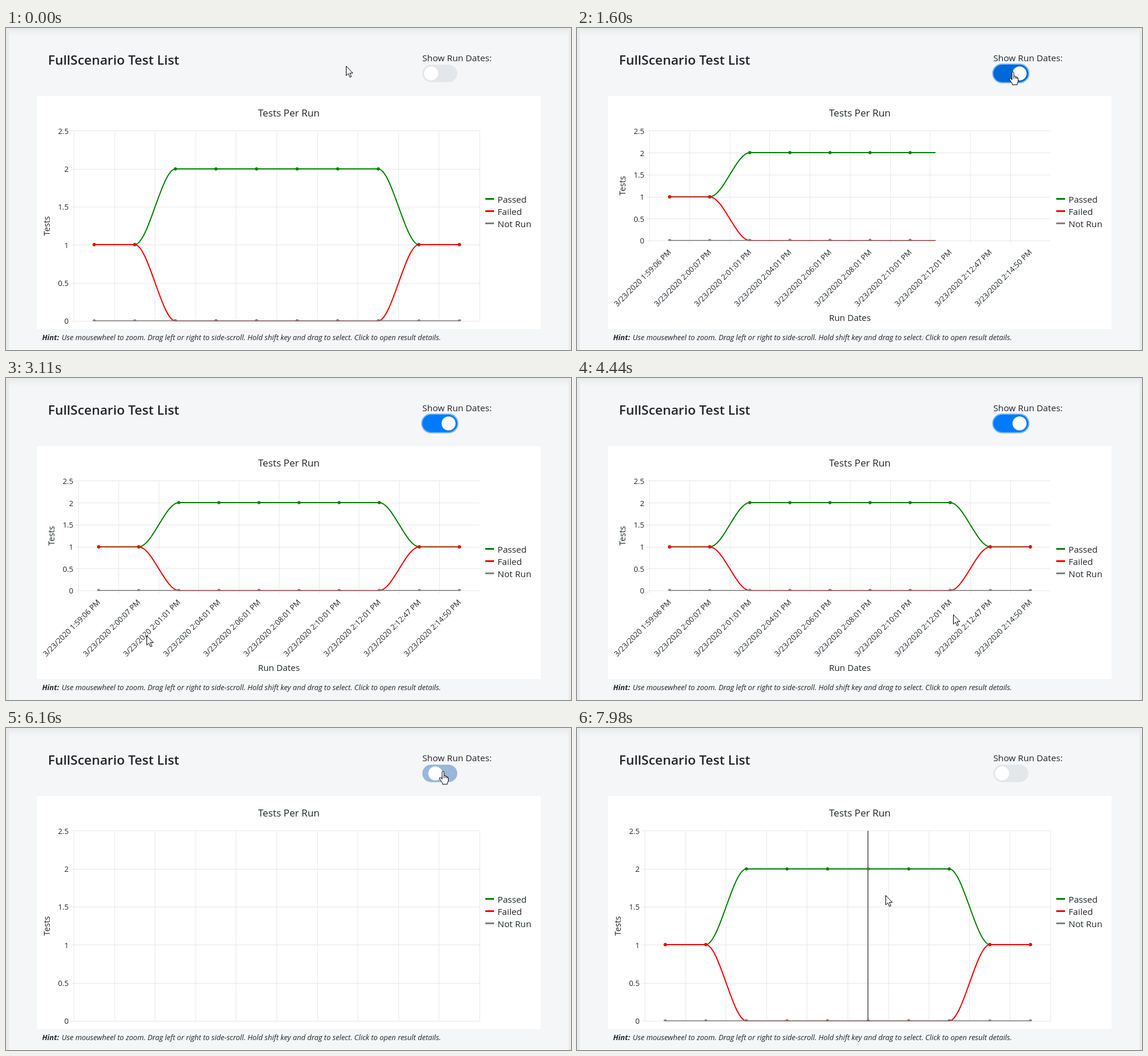
An HTML page that plays this animation: 969x553 px, repeating every 8 s.

```html
<!DOCTYPE html>
<html lang="en">
<head>
<meta charset="utf-8">
<title>Test list chart</title>
<style>
  html, body { margin: 0; width: 100%; height: 100%; overflow: hidden; background: #f5f6f8; }
  svg { display: block; font-family: "Open Sans", "Noto Sans", sans-serif; fill: #212529; }
  .tick { font-size: 13px; }
  .end { text-anchor: end; }
  .mid { text-anchor: middle; }
  .line { fill: none; stroke-width: 2; }
  .grid { fill: none; stroke: #e8e8e8; }
</style>
</head>
<body>
<svg width="969" height="553" viewBox="0 0 969 553">
  <defs>
    <linearGradient id="shade" x2="0" y2="1">
      <stop stop-color="#e9eaec"/><stop offset="1" stop-color="#f5f6f8"/>
    </linearGradient>
  </defs>
  <rect width="969" height="553" fill="#f5f6f8"/>
  <rect width="969" height="14" fill="url(#shade)"/>
  <path d="M0 0H5V553H0ZM965 0H969V553H965Z" fill="#e9eaec"/>
  <text x="72" y="63" font-size="22.4" font-weight="600">FullScenario Test List</text>
  <text x="714" y="57" font-size="15.2">Show Run Dates:</text>
  <rect id="ring" x="712" y="61" width="64" height="34" rx="17" fill="#7ab8fb"/>
  <rect id="track" x="714" y="63" width="60" height="30" rx="15"/>
  <circle id="knob" cy="78" r="12" fill="#fff"/>
  <rect x="53" y="117" width="864" height="400" fill="#fff"/>
  <text class="mid" x="485" y="152" font-size="16.8">Tests Per Run</text>
  <g id="charts"></g>
  <path id="hair" stroke="#777" stroke-width="2"/>
  <g id="legend" font-size="15.2"></g>
  <g font-size="12.63" font-style="italic">
    <text x="62" y="536" font-weight="700">Hint:</text>
    <text x="95.5" y="536">Use mousewheel to zoom. Drag left or right to side-scroll. Hold shift key and drag to select. Click to open result details.</text>
  </g>
  <path id="arrow" d="M.5 .5V16.8L4.2 13.4L6.8 19.6L9.3 18.5L6.7 12.4H11.8Z" fill="#fff" stroke="#000"/>
  <path id="hand" d="M-2 2Q-2 .5 -.4 .5T1.2 2V7.5Q4.2 7 4.2 9Q6.4 8.4 6.6 10Q8.7 10 8.6 12V16Q8.5 18 7 20V22.5H-1.5V20.5L-5.5 14.5Q-7.5 11.5 -6 11Q-4.5 10.7 -2 14ZM1.2 8V12M4.2 9V12M6.6 10V12.5" fill="#fff" stroke="#000"/>
</svg>
<script>
const $ = id => document.getElementById(id);
const COLORS = { Passed: 'green', Failed: '#f80000', 'Not Run': '#808080' };
const passed = [1, 1, 2, 2, 2, 2, 2, 2, 1, 1];
const series = [['Passed', passed], ['Failed', passed.map(v => 2 - v)], ['Not Run', passed.map(() => 0)]];
const times = ['1:59:06', '2:00:07', '2:01:01', '2:04:01', '2:06:01', '2:08:01', '2:10:01', '2:12:01', '2:12:47', '2:14:50'];

const runs = { id: 'runs', left: 116.5, step: 69.6, top: 176.5, bottom: 503, titleX: 75, titleY: 340 };
const dates = { id: 'dates', left: 124.5, step: 68.75, top: 176.5, bottom: 365, titleX: 83, titleY: 271, dated: true };

const pointX = (c, i) => c.left + c.step * (i + .5);
const valueY = (c, v) => c.bottom - (c.bottom - c.top) * v / 2.5;
const pointY = (c, v) => Math.round(valueY(c, v));

function curve(c, values) {
  const h = c.step / 3;
  return values.map((v, i) => {
    const x = pointX(c, i), y = pointY(c, v);
    if (!i) return `M${x} ${y}`;
    return `C${x - c.step + h} ${pointY(c, values[i - 1])} ${x - h} ${y} ${x} ${y}`;
  }).join('');
}

// Darker stretches where two series lie on top of each other
function overlap(c, from, to, v, color) {
  return `<path class="line" stroke="${color}" d="M${pointX(c, from)} ${pointY(c, v)}H${pointX(c, to)}"/>`;
}

function drawChart(c) {
  const right = c.left + c.step * 10;
  let grid = '', labels = '', lines = '', dots = '';
  for (let i = 0; i < 6; i++) {
    const y = valueY(c, i / 2);
    grid += `M${c.left - 5} ${Math.floor(y + .4) + .5}H${right}`;
    labels += `<text class="tick end" x="${c.left - 9}" y="${y + 5.3}">${i / 2}</text>`;
  }
  for (let i = 0; i < (c.dated ? 10 : 11); i++)
    grid += `M${Math.floor(c.left + c.step * i) + .5} ${c.top}V${c.bottom + (c.dated ? 5 : 0)}`;
  if (c.dated) {
    times.forEach((time, i) => labels +=
      `<text class="tick end" transform="translate(${pointX(c, i) + 3.5} 386) rotate(-45)">3/23/2020 ${time} PM</text>`);
    labels += '<text class="mid" x="468" y="502.5" font-size="15">Run Dates</text>';
  }
  for (const [name, values] of series) {
    lines += `<path class="line" stroke="${COLORS[name]}" d="${curve(c, values)}"/>`;
    values.forEach((v, i) => dots +=
      `<circle cx="${pointX(c, i)}" cy="${pointY(c, v)}" r="2.7" fill="${COLORS[name]}"/>`);
  }
  if (c.dated) lines += overlap(c, 0, 1, 1, '#b02a0e') + overlap(c, 8, 9, 1, '#b02a0e') + overlap(c, 2, 7, 0, '#a66a6a');
  return `<g id="${c.id}"><path class="grid" d="${grid}"/>${labels}
    <text class="mid" font-size="14.2" transform="translate(${c.titleX} ${c.titleY}) rotate(-90)">Tests</text>
    <clipPath id="${c.id}Clip"><rect id="${c.id}Reveal" x="${c.left}" y="${c.top}" height="${c.bottom - c.top + .5}"/></clipPath>
    <g clip-path="url(#${c.id}Clip)">${lines}${dots}</g></g>`;
}

$('charts').innerHTML = drawChart(runs) + drawChart(dates);
$('legend').innerHTML = series.map(([name], i) => {
  const y = 293.5 + 21 * i;
  return `<path d="M822 ${y}H837" stroke="${COLORS[name]}" stroke-width="3"/><text x="843" y="${y + 6.5}">${name}</text>`;
}).join('');

const clamp = u => Math.max(0, Math.min(1, u));
const smooth = u => u * u * (3 - 2 * u);
const easeOut = u => 1 - (1 - clamp(u)) ** 2.4;
const mix = (a, b, k) => a + (b - a) * k;

// Cursor moves: start time, end time, bend point, end point
const moves = [
  [500, 1010, 670, 38, 748, 75],
  [2120, 2870, 480, 200, 250, 401],
  [2930, 3230, 252, 435, 226, 462],
  [3230, 3730, 417, 507, 608, 477],
  [3790, 4440, 628, 446, 645, 406],
  [4440, 4580, 655, 380, 664, 356],
  [4610, 5270, 795, 230, 751, 74],
  [5450, 5510, 750, 74, 750, 74],
  [7390, 7410, 749, 74, 748, 75],
  [7410, 7980, 650, 165, 529, 287]
];

function cursorAt(t) {
  let x = 583, y = 65;
  for (const [start, end, bx, by, ex, ey] of moves) {
    if (t < start) break;
    const s = smooth(clamp((t - start) / (end - start))), r = 1 - s;
    x = r * r * x + 2 * r * s * bx + s * s * ex;
    y = r * r * y + 2 * r * s * by + s * s * ey;
  }
  return [x, y];
}

function place(el, visible, x, y) {
  el.style.display = visible ? '' : 'none';
  el.setAttribute('transform', `translate(${Math.round(x)} ${Math.round(y)})`);
}

function reveal(c, visible, progress) {
  $(c.id).style.display = visible ? '' : 'none';
  $(c.id + 'Reveal').setAttribute('width', c.step * 10 * clamp(progress));
}

function render(t) {
  const [x, y] = cursorAt(t);
  const hover = x > 714 && x < 774 && y > 63 && y < 93;
  place($('arrow'), !hover, x, y);
  place($('hand'), hover, x, y);

  const on = easeOut((t - 1190) / 250) - easeOut((t - 6050) / 250);
  const off = hover ? [203, 208, 217] : [228, 231, 234];
  const blue = hover ? [0, 105, 217] : [0, 123, 255];
  $('track').setAttribute('fill', `rgb(${off.map((v, i) => Math.round(mix(v, blue[i], on)))})`);
  $('knob').setAttribute('cx', mix(729, 759, on));

  const dated = t >= 1190 && t < 6060;
  $('ring').style.display = dated ? '' : 'none';
  reveal(dates, dated, (t - 1310) / 408);
  reveal(runs, !dated, t < 1190 ? 1 : (t - 6180) / 408);

  const c = dated ? dates : runs;
  const inside = y > c.top && y < c.bottom - 9 && x > c.left && x < c.left + c.step * 10;
  const near = Math.round(pointX(c, Math.floor((x - c.left) / c.step)));
  $('hair').setAttribute('d', inside ? `M${near} ${c.top}V${c.bottom}` : '');
}

function loop() {
  render(performance.now() % 8000);
  requestAnimationFrame(loop);
}
loop();
</script>
</body>
</html>
```
